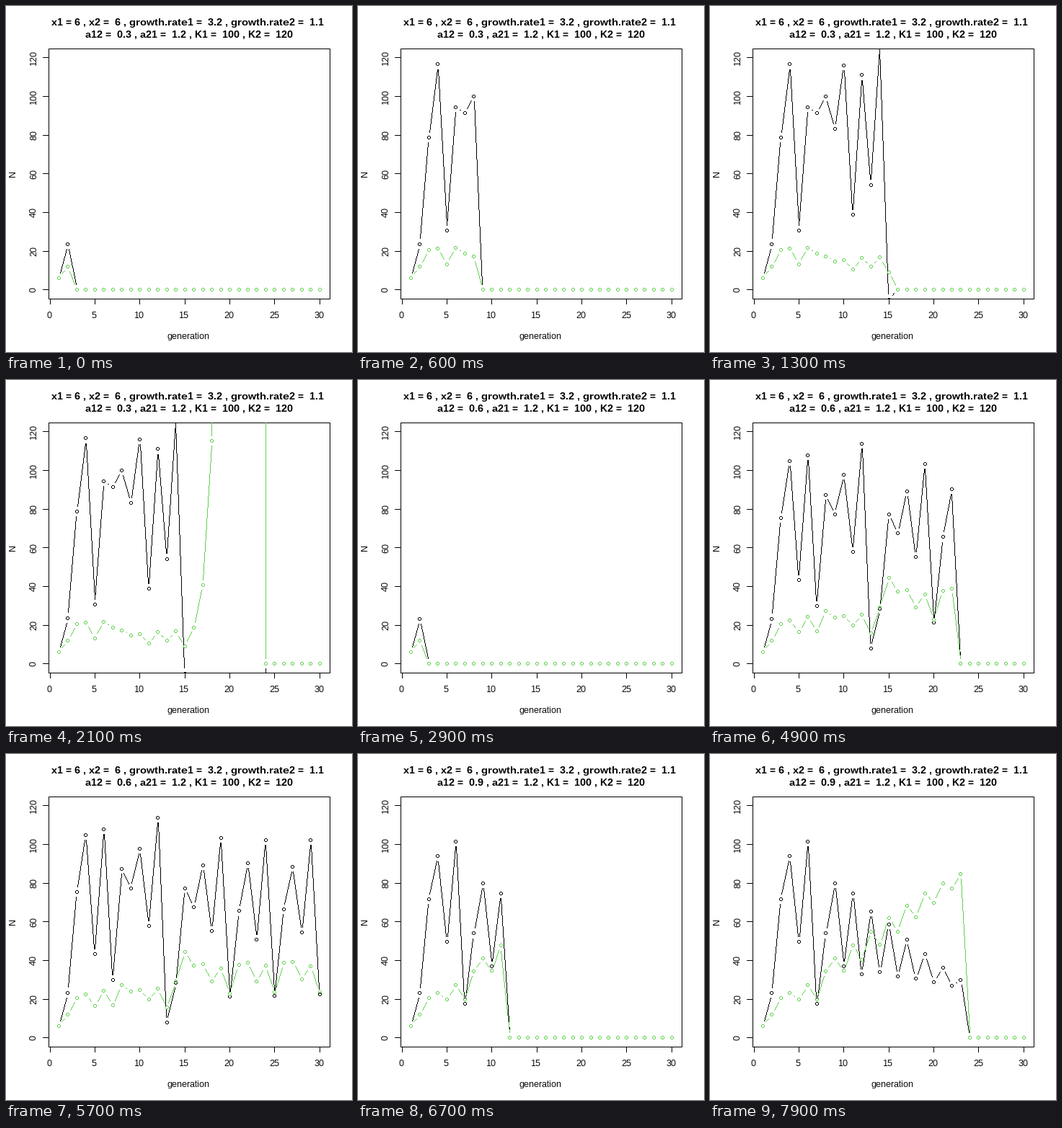
Write a matplotlib script that moves like this. It is 480 px wide and 480 px high and loops after 8 s.

```python
"""Two competing species: discrete Lotka-Volterra runs drawn one generation at a time."""
import math

import matplotlib.pyplot as plt
import numpy as np
from matplotlib.animation import FuncAnimation

plt.rcParams.update({
    "font.family": "Liberation Sans",
    "text.hinting": "native",
    "text.hinting_factor": 1,
})

SIZE, DPI = 480, 72
LEFT, RIGHT, TOP, BOTTOM = 59.04, 449.76, 59.04, 406.56
BOX = (59, 59, 449, 406)         # plot frame in whole pixels
STAGE = (0, 0, SIZE - 1, SIZE - 1)
GENERATIONS = 30
FRAMES, INTERVAL = 80, 100
STEPS = GENERATIONS - 1          # frames per run
GAP = 7.2                        # space between a marker and its line
BLACK, GREEN = (0, 0, 0), (97, 208, 79)

X0, R1, R2 = 6.0, 3.2, 1.1
A21, K1, K2 = 1.2, 100.0, 120.0

# Outline of a five pixel wide circle
RING = [(-1, -2), (1, -2), (2, -1), (2, 1), (1, 2), (-1, 2), (-2, 1), (-2, -1)]


def px(gen):
    return LEFT + (gen + 0.16) / 31.32 * (RIGHT - LEFT)


def py(n):
    n = max(-1e5, min(1e5, n))
    return BOTTOM - (n + 4.8) / 129.6 * (BOTTOM - TOP)


def simulate(a12):
    x1, x2 = [X0], [X0]
    for _ in range(GENERATIONS - 1):
        a, b = x1[-1], x2[-1]
        x1.append(a + R1 * a * (1 - (a + a12 * b) / K1))
        x2.append(b + R2 * b * (1 - (b + A21 * a) / K2))
    return x1, x2


def line(img, p, q, color, clip=STAGE):
    """One pixel wide line without smoothing."""
    (x0, y0), (x1, y1) = [(math.floor(x), math.floor(y)) for x, y in (p, q)]
    n = max(abs(x1 - x0), abs(y1 - y0)) + 1
    xs = np.floor(np.linspace(x0, x1, n) + 0.5).astype(int)
    ys = np.floor(np.linspace(y0, y1, n) + 0.5).astype(int)
    l, t, r, b = clip
    inside = (xs >= l) & (xs <= r) & (ys >= t) & (ys <= b)
    img[ys[inside], xs[inside]] = color


def loop(img, pts, color, clip=STAGE):
    for p, q in zip(pts, pts[1:] + pts[:1]):
        line(img, p, q, color, clip)


def series(img, values, color):
    """Circles joined by lines that stop short of them."""
    pts = [(px(i + 1), py(v)) if math.isfinite(v) else None
           for i, v in enumerate(values)]
    for p, q in zip(pts, pts[1:]):
        if p is None or q is None:
            continue
        dx, dy = q[0] - p[0], q[1] - p[1]
        f = GAP / math.hypot(dx, dy)
        if f < 0.5:
            line(img, (p[0] + f * dx, p[1] + f * dy),
                 (q[0] - f * dx, q[1] - f * dy), color, BOX)
    for p in filter(None, pts):
        loop(img, [(p[0] + i, p[1] + j) for i, j in RING], color, BOX)


def axes_lines(img):
    l, t, r, b = BOX
    loop(img, [(l, t), (r, t), (r, b), (l, b)], BLACK)
    for gen in range(0, 31, 5):
        line(img, (px(gen), b), (px(gen), b + 7), BLACK)
    for n in range(0, 121, 20):
        line(img, (l, py(n)), (l - 8, py(n)), BLACK)


fig = plt.figure(figsize=(SIZE / DPI, SIZE / DPI), dpi=DPI, facecolor="white")
ax = fig.add_axes([0, 0, 1, 1])
ax.axis("off")
blank = np.full((SIZE, SIZE, 3), 255, np.uint8)
view = ax.imshow(blank, extent=(0, SIZE, SIZE, 0), aspect="auto",
                 interpolation="nearest")


def label(x, y, s, size=12, **kw):
    return ax.text(x, y, s, fontsize=size, color="black", ha="center",
                   va="baseline", rotation_mode="anchor", **kw)


for gen in range(0, 31, 5):
    label(px(gen) - 1, 433, str(gen))
for n in range(0, 121, 20):
    label(42, py(n), str(n), rotation=90)
label(253, 462, "generation")
label(13, 232.8, "N", rotation=90)
label(252, 27, "x1 = 6 , x2 =  6 , growth.rate1 =  3.2 , growth.rate2 =  1.1",
      14, weight="bold")
title = label(254, 44, "", 14, weight="bold")

RATES = [0.3, 0.6, 0.9]
RUNS = [simulate(a12) for a12 in RATES]


def update(frame):
    run, step = divmod(frame, STEPS)
    known = step + 2
    # generations not reached yet stay at zero
    first, second = (values[:known] + [0.0] * (GENERATIONS - known)
                     for values in RUNS[run])
    img = blank.copy()
    series(img, first, BLACK)
    axes_lines(img)
    series(img, second, GREEN)
    view.set_data(img)
    title.set_text(f"a12 =  {RATES[run]:.1f} , a21 =  1.2 , K1 =  100 , K2 =  120")
    return view, title


anim = FuncAnimation(fig, update, frames=FRAMES, interval=INTERVAL,
                     repeat=True, repeat_delay=0, blit=False)
plt.show()
```
